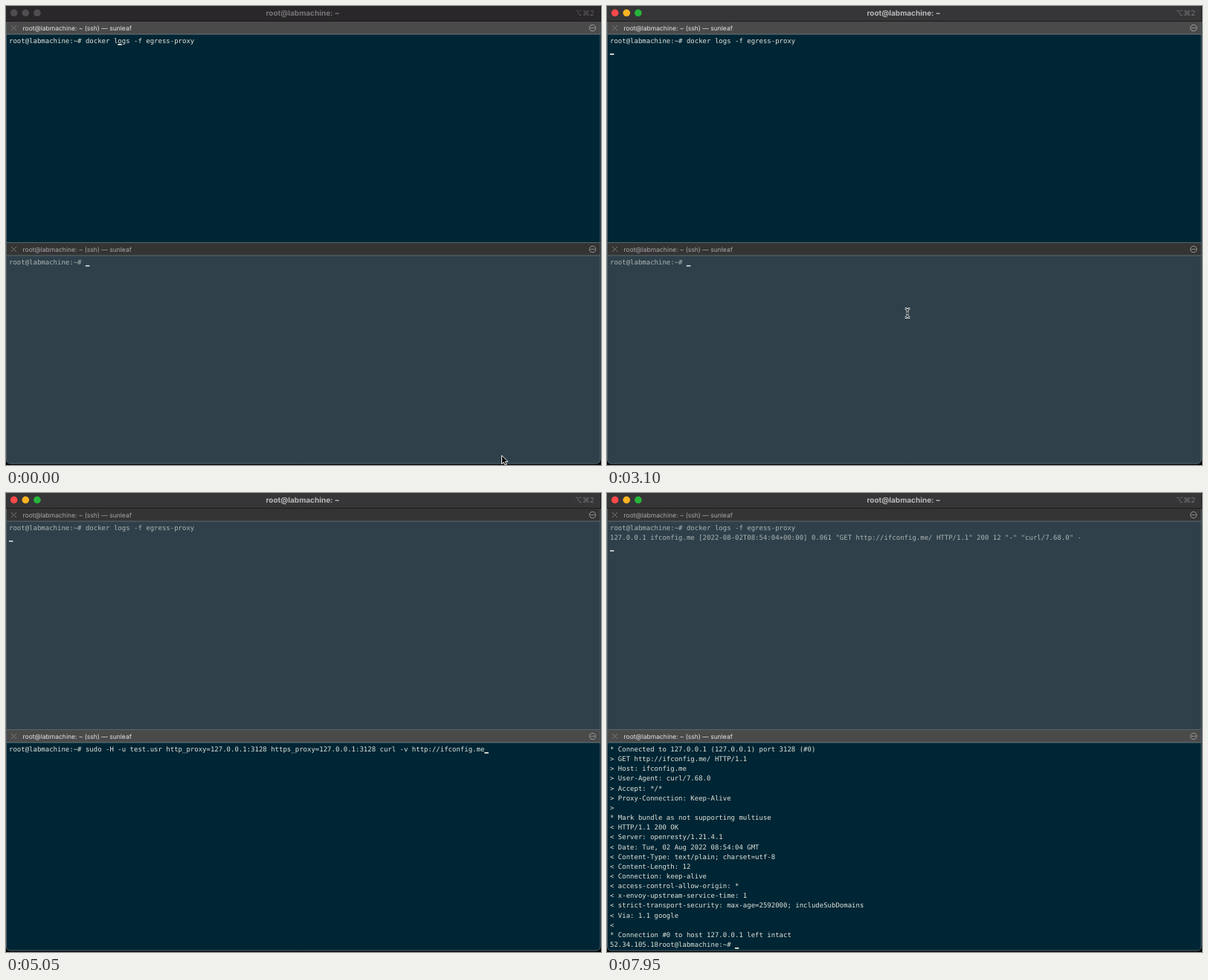
Write an HTML page with a canvas that moves like this. It is 800 px wide and 618 px high and loops after 8 s.

```html
<!DOCTYPE html>
<html lang="en">
<head>
<meta charset="utf-8">
<title>Terminal session</title>
<style>
html, body { margin: 0; width: 100%; height: 100%; overflow: hidden; background: #000; }
canvas { display: block; width: 800px; height: 618px; }
</style>
</head>
<body>
<canvas id="stage" width="800" height="618"></canvas>
<script>
const ctx = document.getElementById('stage').getContext('2d');
ctx.textRendering = 'geometricPrecision';

const LOOP = 8000, STEP = 50;
const MONO = '9px "DejaVu Sans Mono", monospace';
const CELL = 5.418, LINE = 13.15;
const HOST = 'root@labmachine';
const PROMPT = HOST + ':~# ';
const LOGS = PROMPT + 'docker logs -f egress-proxy';
const LOG_LINE = '127.0.0.1 ifconfig.me [2022-08-02T08:54:04+00:00] 0.061 "GET http://ifconfig.me/ HTTP/1.1" 200 12 "-" "curl/7.68.0" -';
const CURL = PROMPT + 'sudo -H -u test.usr http_proxy=127.0.0.1:3128 https_proxy=127.0.0.1:3128 curl -v http://ifconfig.me';
const OUTPUT = `* Connected to 127.0.0.1 (127.0.0.1) port 3128 (#0)
> GET http://ifconfig.me/ HTTP/1.1
> Host: ifconfig.me
> User-Agent: curl/7.68.0
> Accept: */*
> Proxy-Connection: Keep-Alive
>
* Mark bundle as not supporting multiuse
< HTTP/1.1 200 OK
< Server: openresty/1.21.4.1
< Date: Tue, 02 Aug 2022 08:54:04 GMT
< Content-Type: text/plain; charset=utf-8
< Content-Length: 12
< Connection: keep-alive
< access-control-allow-origin: *
< x-envoy-upstream-service-time: 1
< strict-transport-security: max-age=2592000; includeSubDomains
< Via: 1.1 google
<
* Connection #0 to host 127.0.0.1 left intact
52.34.105.18${PROMPT}`.split('\n');

// Moments of the session, in ms
const ACTIVATE = 450, RUN_LOGS = 2100, FOCUS_BOTTOM = 3150,
      HIDE_POINTER = 4250, RECALL = 4800, RUN_CURL = 6950, REPLY = 7050;

const between = (t, a, b) => t >= a && t < b;
const clamp = v => Math.max(0, Math.min(1, v));
const ease = v => v * v * (3 - 2 * v);
const mix = (a, b, v) => a + (b - a) * v;

function rect(x, y, w, h, color) {
  ctx.fillStyle = color;
  ctx.fillRect(x, y, w, h);
}

function text(str, x, y, font, color, align = 'left') {
  ctx.font = font;
  ctx.fillStyle = color;
  ctx.textAlign = align;
  ctx.fillText(str, x, y);
}

function dot(x, y, r, color) {
  ctx.fillStyle = color;
  ctx.beginPath();
  ctx.arc(x, y, r, 0, 7);
  ctx.fill();
}

function titleBar(active) {
  rect(0, 0, 800, 20, active ? '#363537' : '#292729');
  const lights = active ? ['#fc4948', '#fdb423', '#26b53b'] : Array(3).fill('#4f4d4f');
  lights.forEach((color, i) => dot(10.7 + i * 15.6, 9.3, 4.8, color));
  text(HOST + ': ~', 399, 12.8, '700 10px Inter, sans-serif', active ? '#b9b8b9' : '#777577', 'center');
  text('⌥⌘2', 791, 12.5, '10px Inter, "DejaVu Sans", sans-serif', active ? '#747374' : '#5c5a5c', 'right');
  rect(0, 20, 800, 1, '#1b1b1c');
}

function pane(top, height, focused, lines, cursor) {
  rect(0, top, 800, 17, focused ? '#4b4a4b' : '#353435');
  rect(0, top + 17, 800, height - 17, focused ? '#002534' : '#2f404a');
  rect(0, top + 16.5, 800, 1, focused ? '#68777c' : '#5d6b71');

  const mid = top + 8.5;
  ctx.lineWidth = 1;
  ctx.strokeStyle = '#7b7a7b';
  ctx.beginPath();
  ctx.moveTo(7, mid - 3.5); ctx.lineTo(14, mid + 3.5);
  ctx.moveTo(14, mid - 3.5); ctx.lineTo(7, mid + 3.5);
  ctx.stroke();
  text(HOST + ': ~ (ssh) — sunleaf', 22.5, mid + 3.2, '8.5px Inter, sans-serif', focused ? '#e6e5e6' : '#a9a8a9');
  ctx.strokeStyle = '#b4b3b4';
  ctx.lineWidth = .8;
  ctx.beginPath();
  ctx.arc(788.7, mid, 4.2, 0, 7);
  ctx.stroke();
  for (const dx of [-2, 0, 2]) dot(788.7 + dx, mid, .65, '#b4b3b4');

  lines.forEach((line, i) =>
    text(line, 4, top + 29 + i * LINE, MONO, focused ? '#e0e4dc' : '#adb4b3'));
  if (cursor) {
    rect(4 + cursor.col * CELL, top + 30 + Math.round(cursor.row * LINE), 5.4, 1.7,
      focused ? '#f1f3ec' : '#d5dad8');
  }
}

function arrowPointer(x, y) {
  ctx.beginPath();
  [[0, 0], [0, 11.6], [2.7, 9.2], [4.6, 13.2], [6.6, 12.3], [4.8, 8.5], [8.3, 8.4]]
    .forEach(([dx, dy]) => ctx.lineTo(x + dx + .5, y + dy));
  ctx.closePath();
  ctx.fillStyle = '#080808';
  ctx.fill();
  ctx.strokeStyle = '#f4f4f4';
  ctx.lineWidth = 1;
  ctx.stroke();
}

function beamPointer(x, y) {
  ctx.beginPath();
  for (const s of [-1, 1]) {
    ctx.moveTo(x - 3.3, y + s * 6);
    ctx.quadraticCurveTo(x, y + s * 6, x, y + s * 3.5);
    ctx.quadraticCurveTo(x, y + s * 6, x + 3.3, y + s * 6);
  }
  ctx.moveTo(x, y - 4); ctx.lineTo(x, y + 4);
  ctx.moveTo(x - 1.5, y); ctx.lineTo(x + 1.5, y);
  for (const [width, color] of [[2.8, '#e9eded'], [1, '#101c22']]) {
    ctx.lineWidth = width;
    ctx.strokeStyle = color;
    ctx.stroke();
  }
}

function pointer(t) {
  if (t < ACTIVATE) {
    const v = ease(clamp((t - 50) / 250));
    arrowPointer(mix(666, 478, v), mix(605, 149, v));
  } else if (t < RUN_LOGS || between(t, 2650, HIDE_POINTER)) {
    const v = ease(clamp((t - 2650) / 350));
    beamPointer(mix(479.7, 404, v), mix(151, 413.5, v));
  }
}

function topState(t) {
  if (t >= REPLY) return [[LOGS, LOG_LINE], { col: 0, row: 2 }];
  if (t >= RUN_LOGS) return [[LOGS], !between(t, 2600, 3100) && { col: 0, row: 1 }];
  const shown = t < 950 || between(t, 1450, 1950);
  return [[LOGS], shown && { col: 27, row: 0 }];
}

function bottomState(t) {
  if (t >= REPLY) return [OUTPUT, { col: OUTPUT[20].length, row: 20 }];
  if (t >= RUN_CURL) return [[CURL], { col: 0, row: 1 }];
  if (t >= RECALL) return [[CURL], !between(t, 6250, 6750) && { col: CURL.length, row: 0 }];
  const hidden = between(t, FOCUS_BOTTOM, 3250) || between(t, 3750, 4250);
  return [[PROMPT], !hidden && { col: PROMPT.length, row: 0 }];
}

function draw(t) {
  const bottomFocused = t >= FOCUS_BOTTOM;
  rect(0, 0, 800, 618, '#050606');
  ctx.save();
  ctx.beginPath();
  ctx.roundRect(0, 0, 799.5, 616.5, [0, 0, 6, 6]);
  ctx.clip();
  titleBar(t >= ACTIVATE);
  pane(21, 298, !bottomFocused, ...topState(t));
  rect(0, 318, 800, 1, '#56666d');
  pane(319, 299, bottomFocused, ...bottomState(t));
  ctx.restore();

  ctx.strokeStyle = '#53636a';
  ctx.lineWidth = 1;
  ctx.beginPath();
  ctx.moveTo(.5, 21);
  ctx.lineTo(.5, 610);
  ctx.quadraticCurveTo(.5, 616, 6, 616);
  ctx.lineTo(793, 616);
  ctx.quadraticCurveTo(799, 616, 799, 610);
  ctx.lineTo(799, 21);
  ctx.stroke();
  pointer(t);
}

function tick() {
  const t = performance.now() % LOOP;
  draw(Math.floor(t / STEP) * STEP);
  requestAnimationFrame(tick);
}
tick();
</script>
</body>
</html>
```
